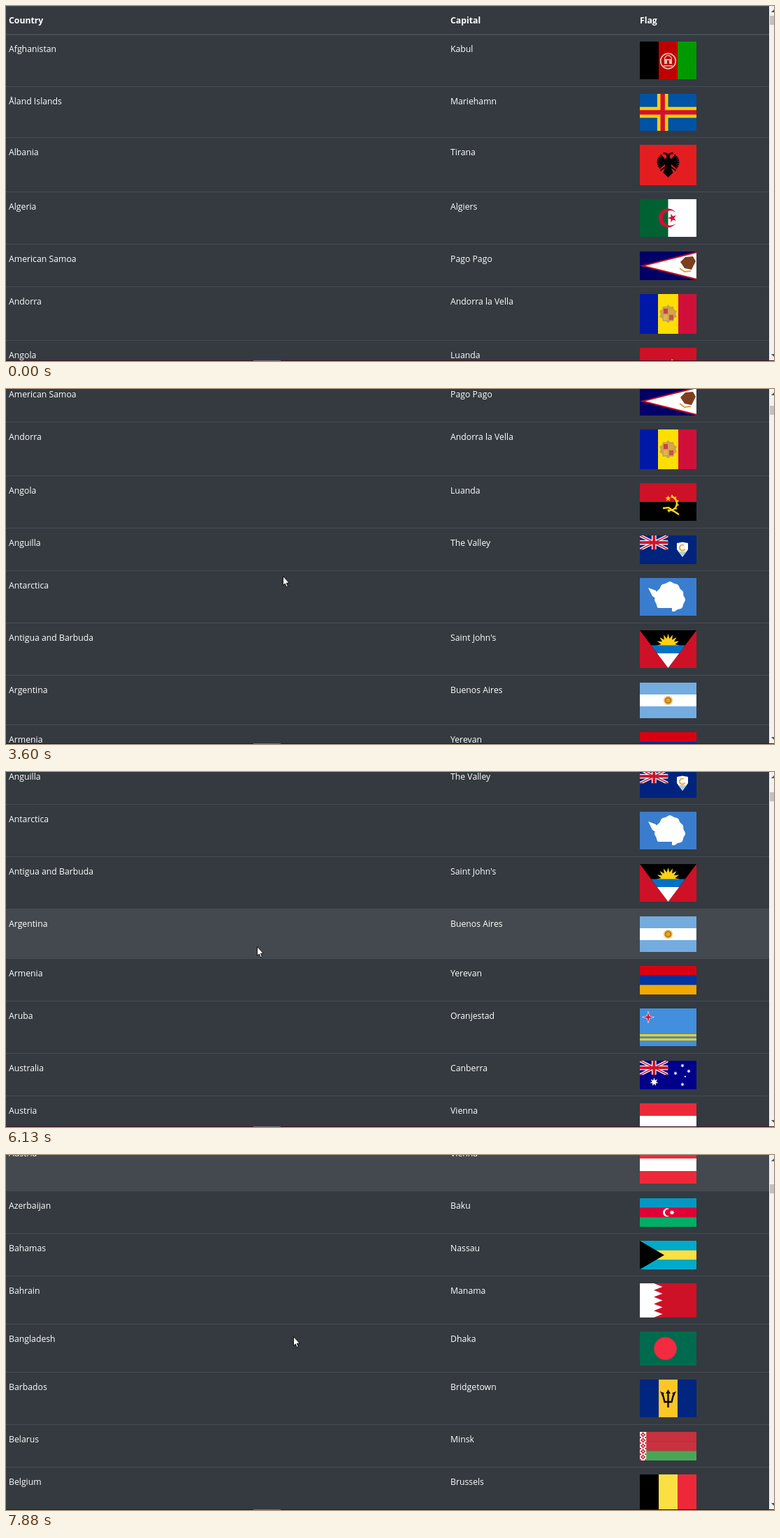
Recreate the animation shown at these times as an HTML page with a canvas. Size 1099 px wide and 509 px high, loop 7.99 s.

```html
<!DOCTYPE html>
<html lang="en">
<head>
<meta charset="utf-8">
<title>Country table</title>
<style>
html, body { margin: 0; width: 100%; height: 100%; overflow: hidden; background: #343a40; }
canvas { display: block; }
</style>
</head>
<body>
<canvas id="stage" width="1099" height="509"></canvas>
<script>
const c = document.getElementById('stage').getContext('2d', { alpha: false });
const LOOP = 7990, STEP = 111;   // the screen updates once per step
const W = 81, PAD = 20.35;

// Drawing helpers; flags use coordinates from their top left corner
function box(x, y, w, h, color) { c.fillStyle = color; c.fillRect(x, y, w, h); }
function trace(pts) {
  c.beginPath();
  for (let i = 0; i < pts.length; i += 2) c.lineTo(pts[i], pts[i + 1]);
}
function poly(color, ...pts) { trace(pts); c.fillStyle = color; c.fill(); }
function line(color, width, ...pts) { trace(pts); c.strokeStyle = color; c.lineWidth = width; c.stroke(); }
function disc(x, y, r, color) { c.beginPath(); c.arc(x, y, r, 0, 7); c.fillStyle = color; c.fill(); }
function ring(x, y, r, width, color, from = 0, to = 2 * Math.PI) {
  c.beginPath(); c.arc(x, y, r, from, to);
  c.strokeStyle = color; c.lineWidth = width; c.stroke();
}
function radial(color, x, y, n, radius, turn = -Math.PI / 2) {
  const pts = [];
  for (let i = 0; i < n; i++) {
    const a = turn + i * 2 * Math.PI / n, r = radius(i, a);
    pts.push(x + r * Math.cos(a), y + r * Math.sin(a));
  }
  poly(color, ...pts);
}
const star = (x, y, r, n, inner, color, turn) =>
  radial(color, x, y, 2 * n, i => i % 2 ? r * inner : r, turn);
function rays(color, width, x, y, r1, r2, from, to, n) {
  for (let i = 0; i < n; i++) {
    const a = from + (to - from) * i / (n - 1), cos = Math.cos(a), sin = Math.sin(a);
    line(color, width, x + r1 * cos, y + r1 * sin, x + r2 * cos, y + r2 * sin);
  }
}
function crescent(x, y, R, dx, r, color) {
  const a = Math.acos((R * R + dx * dx - r * r) / (2 * R * dx));
  const b = Math.atan2(R * Math.sin(a), R * Math.cos(a) - dx);
  c.beginPath();
  c.arc(x, y, R, a, 2 * Math.PI - a);
  c.arc(x + dx, y, r, -b, b, true);
  c.fillStyle = color; c.fill();
}
function mirrored(draw) {
  for (const side of [1, -1]) {
    c.save(); c.translate(W / 2, 0); c.scale(side, 1); draw(); c.restore();
  }
}
const fill = (h, color) => box(0, 0, W, h, color);
const rows = (h, ...colors) => colors.forEach((k, i) => box(0, i * h / colors.length, W, h / colors.length + .1, k));
const cols = (h, ...colors) => colors.forEach((k, i) => box(i * W / 3, 0, W / 3 + .1, h, k));
function cross(x, y, w, h, width, color) {
  box(x - width / 2, 0, width, h, color);
  box(0, y - width / 2, w, width, color);
}
function unionJack() {
  const w = W / 2, h = w / 2;
  c.save();
  c.beginPath(); c.rect(0, 0, w, h); c.clip();
  for (const [color, diagonal, upright] of [['#fff', 4.2, 6.6], ['#cf142b', 1.5, 4]]) {
    line(color, diagonal, 0, 0, w, h);
    line(color, diagonal, 0, h, w, 0);
    cross(w / 2, h / 2, w, h, upright, color);
  }
  c.restore();
}

// Name, capital, flag height / width, flag
const countries = [
  ['Afghanistan', 'Kabul', 2 / 3, h => {
    const k = '#e6bcae';
    cols(h, '#000', '#bf0000', '#009900');
    ring(40.5, 28, 10.8, 1.8, k);
    ring(40.5, 25, 5, 1.3, k, Math.PI, 0);
    box(35, 25, 11, 7, k); box(39, 27, 3, 5, '#bf0000'); box(34, 34, 13, 1.5, k);
  }],
  ['Åland Islands', 'Mariehamn', 17 / 26, h => {
    fill(h, '#0053a5');
    cross(32.7, h / 2, W, h, 15.6, '#ffce00');
    cross(32.7, h / 2, W, h, 6.4, '#d21034');
  }],
  ['Albania', 'Tirana', 5 / 7, h => {
    fill(h, '#e41e20');
    mirrored(() => {
      rays('#000', 2.2, -3, 25, 0, 13, 2.4, 4.1, 8);
      line('#000', 2.6, 0, 20, -2, 13, -7, 12);
      poly('#000', .2, 17, -6, 21, -4, 32, -7, 40, .2, 47);
      line('#000', 2, -3, 31, -11, 37);
    });
  }],
  ['Algeria', 'Algiers', 2 / 3, h => {
    fill(h, '#fff'); box(0, 0, W / 2, h, '#006233');
    crescent(40.5, 27, 13.5, 3.4, 10.8, '#d21034');
    star(46.5, 27, 6.7, 5, .38, '#d21034', Math.PI);
  }],
  ['American Samoa', 'Pago Pago', 1 / 2, h => {
    fill(h, '#000066');
    poly('#bf1020', 0, h / 2, W, 0, W, h);
    poly('#fff', 8, h / 2, W, 2.2, W, h - 2.2);
    poly('#7b3f20', 58, 15, 65, 8, 76, 7, 80, 14, 74, 26, 64, 24);
    line('#d8a24a', 2, 57, 24, 64, 29, 73, 28);
  }],
  ['Andorra', 'Andorra la Vella', 7 / 10, h => {
    cols(h, '#0018a8', '#fedf00', '#d0103a');
    box(26, 0, 29, h, '#fedf00');
    star(40.5, 28.5, 13, 10, .82, '#c7a05c');
    for (const [x, y, k] of [[34, 21, '#c8443a'], [42, 21, '#e0a33a'], [34, 30, '#e8b440'], [42, 30, '#c8543a']])
      box(x, y, 6, 7, k);
  }],
  ['Angola', 'Luanda', 2 / 3, h => {
    const k = '#f9d616';
    rows(h, '#ce1126', '#000');
    ring(43, 29, 10, 2.4, k, -1.4, 1.9);
    rays(k, 2, 43, 29, 10, 12.8, -1.3, 1.7, 7);
    line(k, 2.6, 33, 36, 41, 35, 56, 45);
    star(40.5, 22, 4.5, 5, .4, k);
  }],
  ['Anguilla', 'The Valley', 1 / 2, h => {
    fill(h, '#00247d');
    unionJack();
    poly('#fff', 53, 11, 61, 9.5, 69, 11, 69, 20, 61, 31, 53, 20);
    poly('#9fd4e4', 55, 23, 67, 23, 61, 30);
    ring(61, 17.5, 4, 2, '#f0a52a', .5, 5.2);
  }],
  ['Antarctica', '', 2 / 3, h => {
    fill(h, '#3a7dce');
    radial('#fff', 43, 28, 60, (i, a) => 21 + 1.2 * Math.sin(3 * a) + .8 * Math.sin(11 * a));
    poly('#fff', 12, 14, 23, 18, 30, 34, 18, 26);
    poly('#3a7dce', 22, 43, 46, 43, 46, 52, 22, 52);
  }],
  ['Antigua and Barbuda', "Saint John's", 2 / 3, h => {
    fill(h, '#ce1126');
    trace([0, 0, W, 0, W / 2, h]); c.clip();
    fill(h, '#000');
    star(40.5, 22, 17, 16, .6, '#fcd116');
    box(0, 21.5, W, 12, '#0072c6'); box(0, 33, W, 21, '#fff');
  }],
  ['Argentina', 'Buenos Aires', 5 / 8, h => {
    rows(h, '#74acdf', '#fff', '#74acdf');
    star(40.5, h / 2, 7.5, 16, .65, '#e3a22a');
    ring(40.5, h / 2, 3.8, .8, '#85540f');
  }],
  ['Armenia', 'Yerevan', 1 / 2, h => rows(h, '#d90012', '#0033a0', '#f2a800')],
  ['Aruba', 'Oranjestad', 2 / 3, h => {
    fill(h, '#418fde');
    box(0, 37, W, 3, '#ffd100'); box(0, 43, W, 3, '#ffd100');
    star(12, 12.5, 9.3, 4, .3, '#fff');
    star(12, 12.5, 7.2, 4, .28, '#e0102c');
  }],
  ['Australia', 'Canberra', 1 / 2, h => {
    fill(h, '#00008b');
    unionJack();
    star(20.5, 30.5, 6.2, 7, .45, '#fff');
    for (const [x, y] of [[61, 7], [51, 18], [70, 15], [61, 34]]) star(x, y, 2.9, 7, .45, '#fff');
    star(65, 22.5, 1.7, 5, .45, '#fff');
  }],
  ['Austria', 'Vienna', 2 / 3, h => rows(h, '#ed2939', '#fff', '#ed2939')],
  ['Azerbaijan', 'Baku', 1 / 2, h => {
    rows(h, '#0098c3', '#e00034', '#00ae65');
    crescent(39, h / 2, 6, 2, 5, '#fff');
    star(46, h / 2, 3.6, 8, .55, '#fff');
  }],
  ['Bahamas', 'Nassau', 1 / 2, h => {
    rows(h, '#00abc9', '#fae042', '#00abc9');
    poly('#000', 0, 0, 35, h / 2, 0, h);
  }],
  ['Bahrain', 'Manama', 3 / 5, h => {
    fill(h, '#ce1126'); box(0, 0, 20.3, h, '#fff');
    for (let i = 0; i < 5; i++) poly('#fff', 20, i * h / 5, 32.5, (i + .5) * h / 5, 20, (i + 1) * h / 5);
  }],
  ['Bangladesh', 'Dhaka', 3 / 5, h => { fill(h, '#006a4e'); disc(36.5, h / 2, 16.2, '#f42a41'); }],
  ['Barbados', 'Bridgetown', 2 / 3, h => {
    cols(h, '#00267f', '#ffc726', '#00267f');
    mirrored(() => {
      poly('#000', 0, 14, -3.3, 20, -1.3, 20, -1.3, 40, 0, 40);
      line('#000', 2.4, 0, 32, -5, 32, -7, 24, -9, 20);
      poly('#000', -12, 17, -6, 19, -7, 23);
    });
  }],
  ['Belarus', 'Minsk', 1 / 2, h => {
    rows(h, '#c8313e', '#c8313e', '#4aa657');
    box(0, 0, 9.2, h, '#fff');
    for (let y = 4; y < h; y += 8) {
      star(4.6, y, 4, 4, .6, '#c8313e');
      disc(4.6, y, 1, '#fff');
      box(0, y + 3, 2, 2, '#c8313e'); box(7.2, y + 3, 2, 2, '#c8313e');
    }
  }],
  ['Belgium', 'Brussels', 13 / 15, h => cols(h, '#000', '#fae042', '#ed2939')]
];

// Key poses: step, pointer x and y, scroll position, highlighted row.
// The highlight stays on its row until the pointer is read again.
const poses = [
  [2, 1000, 491, 0, -1], [10, 339, 54, 0, -1], [19, 251, 169, 0, -1],
  [20, 252, 171, 5, 1], [23, 252, 171, 85, 2], [27, 259, 172, 147, 2],
  [34, 430, 292, 406, 9], [39, 483, 301, 406, 9], [45, 490, 302, 406, 9],
  [55, 359, 250, 569, 10], [60, 356, 299, 737, 13], [67, 402, 266, 835, 14], [71, 411, 260, 1057, 14]
];
function poseAt(step) {
  const i = Math.max(0, poses.findLastIndex(p => p[0] <= step));
  const a = poses[i], b = poses[i + 1] || a;
  const f = Math.min(1, Math.max(0, (step - a[0]) / (b[0] - a[0] || 1)));
  const ease = f * f * (3 - 2 * f);
  const [x, y, scroll] = [1, 2, 3].map(j => Math.round(a[j] + (b[j] - a[j]) * ease));
  return { x, y, scroll, hover: a[4] };
}

function text(str, x, y, weight = 500) {
  c.font = weight + ' 12.25px "Open Sans", "Noto Sans", sans-serif';
  c.fillStyle = '#fff';
  c.fillText(str, x, y);
}

function drawTable(scroll, hover) {
  box(0, 0, 1099, 509, '#343a40');
  box(0, -scroll, 1092, 1, '#454d55');
  box(0, 40 - scroll, 1092, 2, '#454d55');
  text('Country', 4, 25 - scroll, 700);
  text('Capital', 636, 25 - scroll, 700);
  text('Flag', 907, 25 - scroll, 700);
  let y = 51 - scroll;
  countries.forEach(([name, capital, ratio, flag], i) => {
    const h = Math.round(81.25 * ratio), rowHeight = Math.round(81.25 * ratio + PAD);
    if (i === hover) box(0, y - 10, 1092, rowHeight, '#43494e');
    if (i) box(0, y - 11, 1092, 1, '#454d55');
    text(name, 4, y + 15);
    text(capital, 636, y + 15);
    c.save();
    c.translate(907, y);
    c.beginPath(); c.rect(0, 0, W, h); c.clip();
    flag(h);
    c.restore();
    y += rowHeight;
  });
}

function drawFrame(scroll) {
  box(1092, 0, 7, 508, '#f1f1f1');
  box(1093, Math.round(14 + scroll * .0268), 6, 13, '#c1c1c1');
  poly('#505050', 1095, 9, 1099, 5, 1099, 9);
  poly('#505050', 1095, 499, 1099, 499, 1099, 503);
  box(0, 508, 1099, 1, '#3b111c');
  box(354, 508, 39, 1, '#77646a');
}

function drawCursor(x, y) {
  c.save();
  c.translate(x, y);
  trace([.5, .5, .5, 13.5, 3.3, 11, 5.2, 15.7, 7.3, 14.8, 5.4, 10.3, 9.3, 10]);
  c.closePath();
  c.fillStyle = '#fff'; c.fill();
  c.strokeStyle = '#000'; c.lineWidth = .9; c.stroke();
  c.restore();
}

function draw(now) {
  const step = Math.floor((now % LOOP + 1) / STEP);
  const { x, y, scroll, hover } = poseAt(step);
  drawTable(scroll, hover);
  drawFrame(scroll);
  if (step >= poses[0][0]) drawCursor(x, y);
}

const start = performance.now();
function tick() {
  draw(Math.max(0, performance.now() - start));
  requestAnimationFrame(tick);
}
tick();
</script>
</body>
</html>
```
